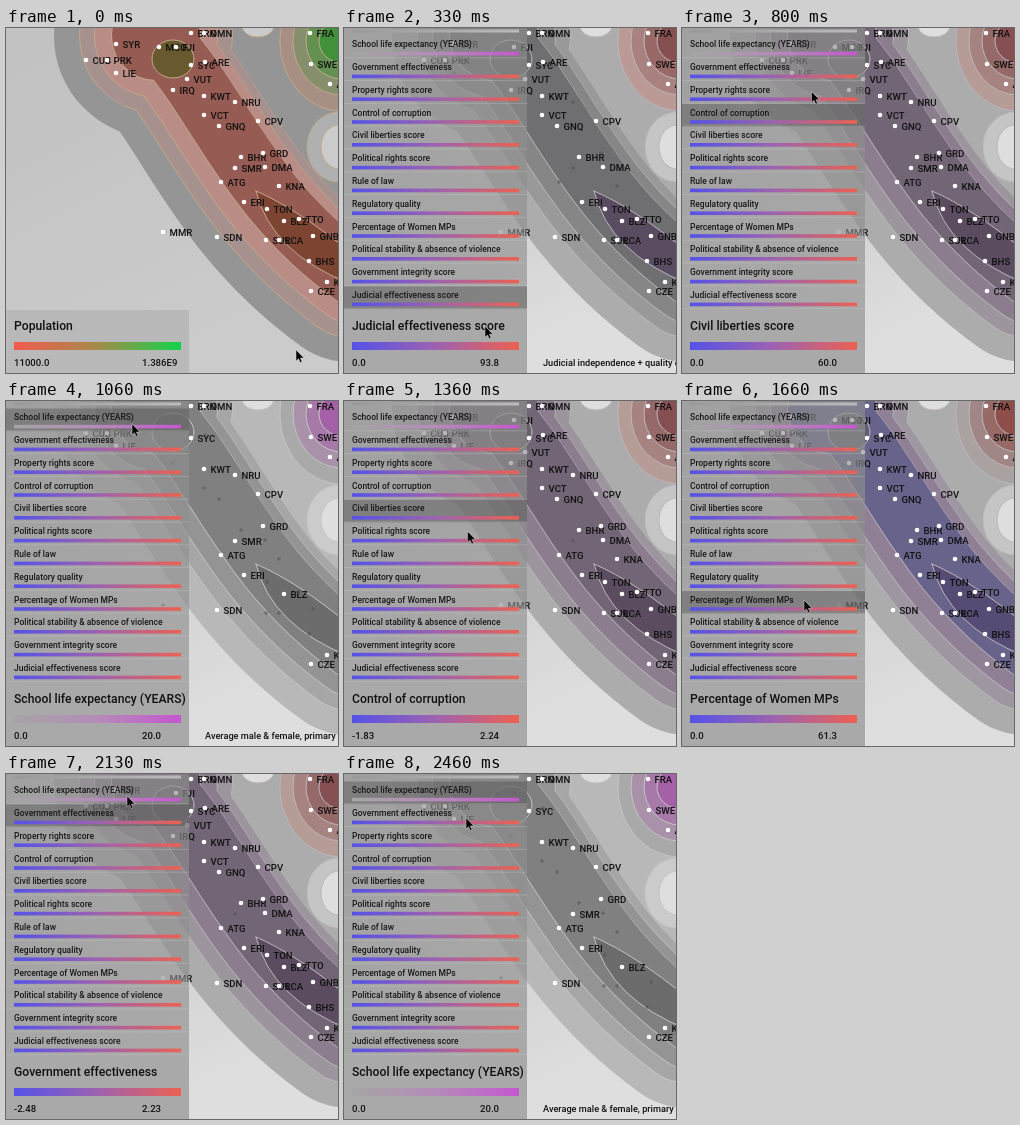
An HTML page with a canvas that plays this animation: 332x345 px, repeating every 2.56 s.

```html
<!DOCTYPE html>
<html lang="en">
<meta charset="utf-8">
<title>Score map</title>
<style>
  html, body { margin: 0; width: 100%; height: 100%; overflow: hidden; background: #c8c8c8; }
  canvas { display: block; }
</style>
<canvas id="stage" width="332" height="345"></canvas>
<script>
const ctx = document.getElementById('stage').getContext('2d');
const LOOP = 2560, WIDTH = 332, HEIGHT = 345;
const PANEL_W = 183, ROW_H = 22.8, ROW_TOP = 7.5, LEGEND_Y = 282, LEFT = 8, BAR_W = 167;
const FONT = 'Roboto, "Open Sans", sans-serif';

// ridge: outer, middle and inner tone; corner: outer and inner tone
const base = { bg: ['#c2c2c2', '#dedede'], bar: ['#5552e8', '#9d62b0', '#ec6152'], line: '#bdb6bd' };
const palettes = {
  population: { ...base, ridge: ['#959595', '#b98c86', '#965b53'], core: '#7d4432', blob: '#69592f',
    corner: ['#a88f83', '#42903a'], line: '#c2a98a', bg: ['#c2c2c2', '#cbcbcb'],
    bar: ['#f25a50', '#a58b48', '#10d34c'] },
  grey: { ...base, ridge: ['#b8b8b8', '#949494', '#808080'], core: '#6c6c6c', blob: '#757575',
    corner: ['#a9a9a9', '#a561a8'], line: '#c4c4c4', bar: ['#a5a5a5', '#b58bb9', '#c557d0'] },
  judicial: { ...base, ridge: ['#acacac', '#868686', '#6f6e71'], core: '#5a4c60', blob: '#656565',
    corner: ['#bb9a95', '#865050'] },
  women: { ...base, ridge: ['#acacac', '#8f8096', '#67638a'], core: '#564b74', blob: '#626070',
    corner: ['#a9a2a1', '#8f4e49'] },
  violet: { ...base, ridge: ['#acacac', '#8b7d8d', '#726676'], core: '#5b4c60', blob: '#666267',
    corner: ['#b69c97', '#865052'] }
};

const score = (name, min, max, palette = 'violet', missing = '', caption = '') =>
  ({ name, min, max, ...palettes[palette], missing, caption });
const fewer = 'MCO LIE NRU GRD SMR ATG KNA';
const population = score('Population', '11000.0', '1.386E9', 'population');
const scores = [
  score('School life expectancy (YEARS)', '0.0', '20.0', 'grey',
    'SYR MCO FJI ARE VUT IRQ VCT GNQ BHR DMA KNA TON TTO SUR LCA GNB BHS MMR',
    'Average male & female, primary to tertiary'),
  score('Government effectiveness', '-2.48', '2.23', 'violet', 'MCO SMR'),
  score('Property rights score', '0.0', '97.4', 'judicial', fewer),
  score('Control of corruption', '-1.83', '2.24', 'violet', 'MCO SMR'),
  score('Civil liberties score', '0.0', '60.0'),
  score('Political rights score', '0.0', '40.0'),
  score('Rule of law', '-2.34', '2.04', 'violet', 'MCO'),
  score('Regulatory quality', '-2.36', '2.23', 'violet', 'MCO'),
  score('Percentage of Women MPs', '0.0', '61.3', 'women'),
  score('Political stability & absence of violence', '-2.96', '1.92'),
  score('Government integrity score', '0.0', '96.7', 'judicial', fewer),
  score('Judicial effectiveness score', '0.0', '93.8', 'judicial', fewer,
    'Judicial independence + quality of process')
];

// Labelled dots: code, x, y
const places = `SYR 110 16,MCO 153 19,FJI 170 19,CUB 80 32,PRK 101 32,LIE 110 45,IRQ 167 62,VUT 181 51,
SYC 185 37,ARE 199 34,BRN 185 5,OMN 198 5,KWT 198 68,NRU 229 74,VCT 198 87,GNQ 213 98,CPV 252 93,
BHR 235 129,GRD 257 125,SMR 229 140,DMA 259 139,ATG 215 154,KNA 273 158,ERI 238 174,TON 261 181,
BLZ 278 193,TTO 293 191,SDN 211 209,SUR 260 212,LCA 273 212,GNB 307 208,BHS 303 233,KOR 321 254,
CZE 305 263,MMR 157 204,FRA 304 5,SWE 305 36,AUT 324 56`
  .split(',').map(p => p.trim().split(' ')).map(([code, x, y]) => ({ code, x: +x, y: +y }));

// time, x, y of the pointer tip
const pointerKeys = [[0, 290, 322], [30, 290, 322], [330, 141, 299], [600, 135, 127], [930, 126, 23],
  [1100, 126, 23], [1530, 122, 200], [1660, 122, 200], [1815, 121, 88], [1930, 121, 59],
  [2130, 121, 22], [2400, 121, 22], [2460, 122, 44], [LOOP, 122, 44]];

const mix = (a, b, k) => a + (b - a) * k;
const blend = (a, b, k) => `color-mix(in srgb, ${a}, ${b} ${k * 100}%)`;

function pointerAt(t) {
  const i = Math.max(1, pointerKeys.findIndex(k => k[0] >= t));
  const a = pointerKeys[i - 1], b = pointerKeys[i];
  const k = Math.max(0, (t - a[0]) / (b[0] - a[0]));
  return { x: mix(a[1], b[1], k), y: mix(a[2], b[2], k) };
}
function rowAt(t) {
  const row = Math.floor((pointerAt(t).y - ROW_TOP) / ROW_H);
  return Math.max(0, Math.min(scores.length - 1, row));
}

function rect(x, y, w, h, fill) {
  ctx.fillStyle = fill;
  ctx.fillRect(x, y, w, h);
}
function text(s, x, y, size, fill = '#111') {
  ctx.font = `500 ${size}px ${FONT}`;
  ctx.fillStyle = fill;
  ctx.fillText(s, x, y);
}
function gradient(x0, y0, x1, y1, colors) {
  const g = ctx.createLinearGradient(x0, y0, x1, y1);
  colors.forEach((c, i) => g.addColorStop(i / (colors.length - 1), c));
  return g;
}
const bar = (y, h, colors) => rect(LEFT, y, BAR_W, h, gradient(LEFT, 0, LEFT + BAR_W, 0, colors));

function shape(path, fill, line) {
  ctx.fillStyle = fill;
  ctx.fill(path);
  if (!line) return;
  ctx.lineWidth = 1;
  ctx.strokeStyle = line;
  ctx.stroke(path);
}
function oval(x, y, rx, ry, fill, line) {
  const path = new Path2D();
  path.ellipse(x, y, rx, ry, 0, 0, 7);
  shape(path, fill, line);
}

// One contour of the ridge: a round hill joined to a thick curve, grown more to the lower left.
function ridge(grow, fill) {
  const shift = grow * .16;
  const spine = new Path2D(`M${150 - shift} ${8 + shift}c62 60 85 157 200 240`);
  ctx.lineCap = 'round';
  ctx.lineWidth = 2 * (31 + grow * .78);
  ctx.strokeStyle = fill;
  ctx.stroke(spine);
  oval(150, 8, 44 + grow, 44 + grow, fill);
}

function drawMap({ bg, ridge: [outer, middle, inner], core, blob, corner, line, missing, caption }) {
  rect(0, 0, WIDTH, HEIGHT, gradient(0, 40, 150, HEIGHT, bg));
  ridge(58, outer);
  shape(new Path2D('M195 0H345V220Z'), outer);
  oval(252, -2, 16, 11, bg[1], line);
  oval(333, 119, 32, 35, blend(outer, bg[1], .5), line);
  oval(333, 119, 18, 22, bg[1], line);
  for (let n = 0; n < 4; n++)
    oval(336, 13, 62 - n * 13, 70 - n * 16, blend(...corner, n / 3), line);

  [[32, blend(outer, middle, .5)], [17, middle], [0, inner]].forEach(([grow, fill]) => {
    ridge(grow + .8, line);
    ridge(grow, fill);
  });
  oval(167, 31, 21, 19, blob, line);
  shape(new Path2D('M250 163Q290 180 345 225V256Q265 225 250 163Z'), core, line);

  for (const { code, x, y } of places) {
    const hidden = missing.includes(code);
    const r = hidden ? 1.8 : 2.3;
    oval(x, y, r, r, hidden ? 'rgba(75,75,75,.5)' : '#fff');
    if (!hidden) text(code, x + 6.5, y + 3.5, 9.6);
  }
  text(caption, 199, 338, 9.2);
}

function drawList(active) {
  rect(0, 0, PANEL_W, LEGEND_Y, 'rgba(143,143,143,.64)');
  bar(1.5, 3, ['#999', '#bbb']);
  scores.forEach((item, i) => {
    const y = ROW_TOP + i * ROW_H;
    if (i === active) rect(0, y, PANEL_W, ROW_H, 'rgba(70,70,70,.38)');
    rect(0, y + ROW_H - 1, PANEL_W, 1, 'rgba(205,205,205,.3)');
    text(item.name, LEFT, y + 11.6, 8.5, '#181818');
    bar(y + 16.3, 3.6, item.bar);
  });
}

function drawLegend(item, open) {
  rect(0, LEGEND_Y, PANEL_W, HEIGHT - LEGEND_Y, open ? '#a9a9a9' : '#b9b9b9');
  text(item.name, LEFT, 302, 12.2);
  bar(314, 8, item.bar);
  text(item.min, LEFT, 338, 9.6);
  text(item.max, 136, 338, 9.6);
}

function drawPointer({ x, y }) {
  ctx.save();
  ctx.translate(x, y);
  shape(new Path2D('M0 0V11L2.5 8.7L4.3 12.5L6 11.7L4.4 8H7.8Z'), '#000', 'rgba(215,215,215,.5)');
  ctx.restore();
}

function draw(now) {
  const t = now % LOOP, pointer = pointerAt(t);
  const open = pointer.x < PANEL_W;
  // The chosen score trails the highlighted row, which trails the pointer.
  const chosen = open ? scores[rowAt(t - 115)] : population;
  drawMap(chosen);
  if (open) drawList(rowAt(t - 50));
  drawLegend(chosen, open);
  drawPointer(pointer);
  requestAnimationFrame(draw);
}
requestAnimationFrame(draw);
</script>
</html>
```
